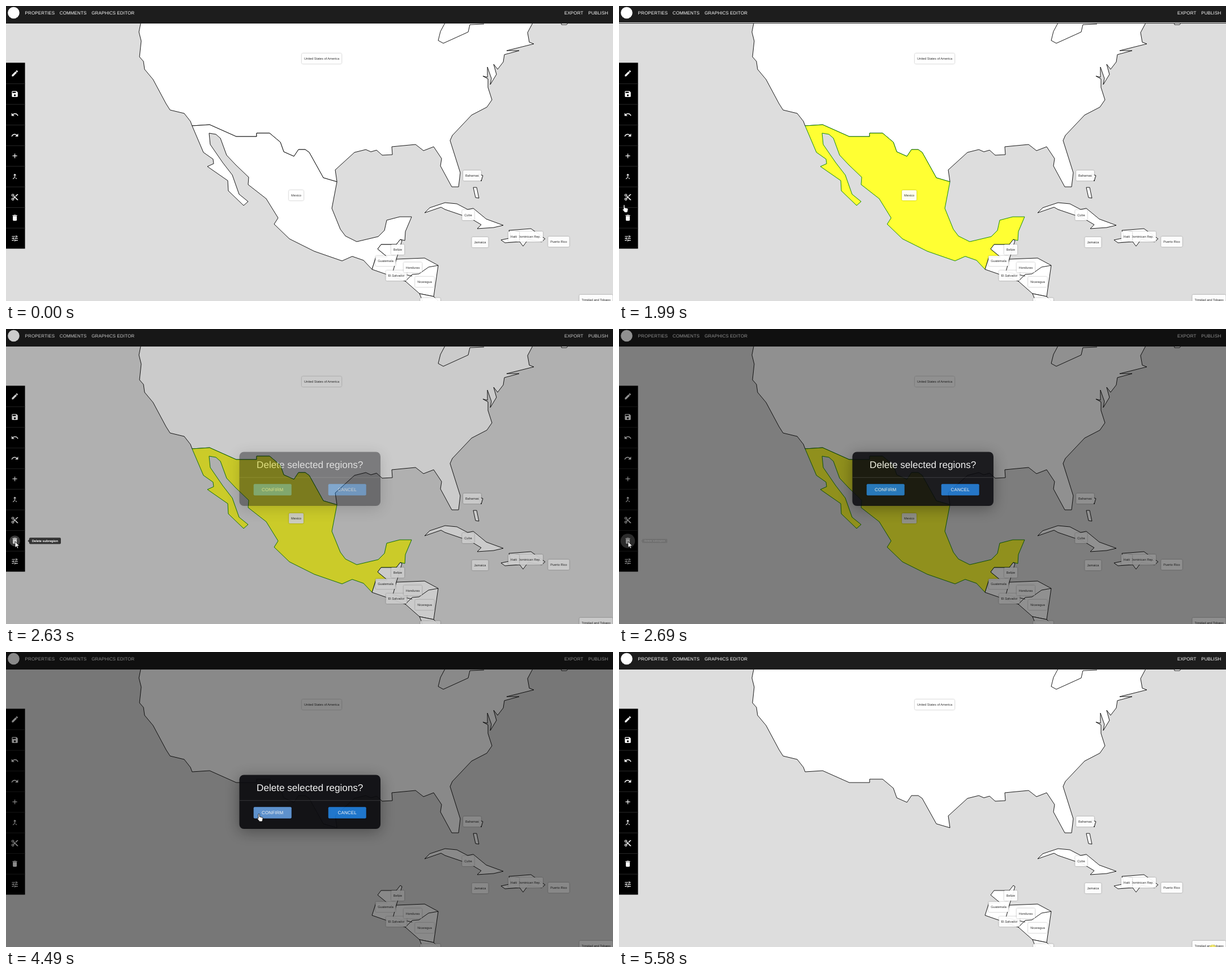
Write an HTML page that moves like this. It is 1073x522 px and loops after 5750 ms.

```html
<!DOCTYPE html>
<html lang="en">
<head>
<meta charset="utf-8">
<title>Map editor</title>
<style>
  html, body { margin: 0; width: 100%; height: 100%; overflow: hidden; background: #ddd; }
  svg { display: block; width: 1073px; height: 522px; }
  text { font-family: "Liberation Sans", Arial, sans-serif; text-rendering: geometricPrecision; }
  .land { fill: #fff; stroke: #000; stroke-width: .9; stroke-linejoin: round; }
  .line { fill: none; }
  .picked { fill: #ff3; stroke: #008000; }
  .label { opacity: .92; }
  .label rect { fill: #fff; filter: drop-shadow(0 .6px 1px rgba(0,0,0,.4)); }
  .label text { font-size: 5.65px; fill: #222; text-anchor: middle; }
  .menu { font-size: 8px; letter-spacing: .12px; fill: #fff; }
  .btn { font-size: 8px; letter-spacing: .15px; fill: #fff; text-anchor: middle; }
  #panel { filter: drop-shadow(0 5px 13px rgba(0,0,0,.38)); }
  .btnBox { filter: drop-shadow(0 1px 1px rgba(0,0,0,.4)); }
  .cursor { fill: #fff; stroke: #000; stroke-width: .8; stroke-linejoin: round; }
</style>
</head>
<body>
<svg viewBox="0 0 1073 522">
  <rect width="1073" height="522" fill="#ddd"/>
  <g id="map"></g>
  <g id="labels"></g>
  <rect width="1073" height="31" fill="#1d1d1d"/>
  <rect id="headLine" y="29" width="1073" height="1" fill="#fff"/>
  <circle cx="13.5" cy="12" r="10.3" fill="#fff"/>
  <text class="menu" x="33.6" y="14.8">PROPERTIES<tspan dx="8.6">COMMENTS</tspan><tspan dx="8.8">GRAPHICS EDITOR</tspan></text>
  <text class="menu" x="1064.3" y="14.8" text-anchor="end">EXPORT<tspan dx="8.8">PUBLISH</tspan></text>
  <rect y="100.4" width="33.6" height="329" fill="#000"/>
  <circle id="toolRipple" cx="15.5" cy="375" fill="#fff"/>
  <g id="tools"></g>
  <rect id="shade" width="1073" height="522"/>
  <g id="dialog">
    <rect id="panel" x="412.5" y="217.5" width="249.5" height="95.5" rx="8" fill="#0b0b0f"/>
    <path d="M413 262.8H662" stroke="#fff" stroke-opacity=".17"/>
    <text x="537.2" y="245.6" font-size="17.1" fill="#fff" text-anchor="middle">Delete selected regions?</text>
    <clipPath id="okClip"><rect x="437.7" y="274.2" width="67" height="20.3" rx="2"/></clipPath>
    <rect class="btnBox" id="ok" x="437.7" y="274.2" width="67" height="20.3" rx="2"/>
    <g clip-path="url(#okClip)"><circle id="okRipple" cx="447" cy="288" fill="#fff" opacity=".3"/></g>
    <rect class="btnBox" x="569.7" y="274.2" width="67" height="20.3" rx="2" fill="#1976d2"/>
    <text class="btn" x="471.2" y="287.3">CONFIRM</text>
    <text class="btn" x="603.2" y="287.3">CANCEL</text>
  </g>
  <g id="tip">
    <path d="M38.5 375L41.5 372V378Z" fill="#333"/>
    <rect x="41" y="369.3" width="56" height="11.3" rx="2" fill="#333"/>
    <text x="69" y="377" font-size="5.7" font-weight="bold" fill="#fff" text-anchor="middle">Delete subregion</text>
  </g>
  <circle id="spot" cx="1049.5" cy="524" r="6.3" fill="#f4e84a" opacity=".75"/>
  <path id="arrow" class="cursor" d="M0 0V10.8L2.5 8.5 4.2 12.2 5.9 11.4 4.2 7.9H7.6Z"/>
  <path id="hand" class="cursor" d="M-1 1a1.1 1.1 0 0 1 2.2 0V5L6 6.1Q7.2 6.5 7.1 8L6.3 12Q6 13.4 4.8 13.4H1.2L-2.6 8.8Q-3.2 7.4-2 7.3L-1 8Z"/>
</svg>
<script>
const LOOP = 5750;
const $ = id => document.getElementById(id);
const add = (parent, markup) => {
  $(parent).insertAdjacentHTML('beforeend', markup);
  return $(parent).lastElementChild;
};
const clamp = v => Math.min(1, Math.max(0, v));
const mix = (a, b, p) => a + (b - a) * p;
const span = (t, start, length) => clamp((t - start) / length);
const within = (t, a, b) => t >= a && t < b;

// Key corners of coasts and borders; neighbours share the border run
const border = '329,212 360,210 407,231 443,231 443,225 466,225 485,241 491,258 509,266 517,254 529,254 536,259 561,304 585,311';
const usEast = '582,290 616,259 636,254 645,258 655,255 665,264 683,263 682,249 724,245 738,256 756,249 770,270 768,283 788,320 800,320 '
  + '803,295 785,238 789,229 823,193 850,179 859,166 852,144 852,129 843,124 851,126 851,108 858,128 856,139 867,121 862,103 869,112 '
  + '879,99 881,86 907,79 885,79 933,67 925,64 922,47 931,30';
const usWest = '931,26 239,26 235,46 239,62 236,90 243,98 245,112 260,130 283,173 290,184 315,190 326,204';
const mxEast = '576,358 591,395 600,407 620,417 658,408 669,397 673,379 696,373 717,373 706,399 705,415 697,413 690,422 663,422 657,430 674,444 654,444 647,466';
const mxWest = '632,450 612,443 594,451 545,434 501,412 474,386 481,375 460,341 428,316 429,303 406,281 390,264 379,234 371,227 359,225';
const baja = '361,245 383,277 400,299 412,333 428,346 420,353 393,327 392,309 356,284 367,279 366,271 349,259';

const land = (...runs) => add('map', `<polygon class="land" points="${runs.join(' ')}"/>`);
const line = points => add('map', `<polyline class="land line" points="${points}"/>`);

land(border, usEast, usWest);
line('776,30 768,45 764,61 773,66 817,46 820,33 845,32');
land('981,28 982,33 991,33 995,28');
const mexico = land(border, mxEast, mxWest, baja);
// Central America
land('647,466 654,444 674,444 657,430 663,422 690,422 697,413 700,415 690,448 740,446 764,459 756,514 731,509 706,487 673,475');
line('690,448 684,470 718,478');
line('706,487 718,475 730,474 747,462 764,459');
land('731,509 756,514 768,526 738,526');
// Islands
land('740,366 749,357 776,348 797,350 816,360 826,358 849,377 879,388 862,392 833,394 840,387 820,375 776,360 769,356');
land('826,321 832,321 836,340 830,339');
land('835,297 843,300 840,310');
land('875,414 894,410 889,397 928,394 953,412 947,417 923,413 914,425 908,417 882,419');

const places = [
  ['United States of America', 558, 93], ['Mexico', 513, 335], ['Bahamas', 824, 300], ['Cuba', 817, 370],
  ['Jamaica', 838, 418], ['Dominican Rep.', 925, 408], ['Haiti', 897.5, 408], ['Puerto Rico', 977, 417],
  ['El Salvador', 690, 477], ['Guatemala', 671, 451], ['Belize', 692.5, 431], ['Honduras', 719, 462.5],
  ['Nicaragua', 740, 488], ['Costa Rica', 750, 525.5], ['Trinidad and Tobago', 1043, 520]
];
const labels = places.map(([name, x, y]) => {
  const g = add('labels', `<g class="label" transform="translate(${x} ${y})">
    <rect y="-9" height="18" rx="1.8"/><text y="2">${name}</text></g>`);
  const width = g.lastElementChild.getComputedTextLength() + 8;
  g.firstElementChild.setAttribute('x', -width / 2);
  g.firstElementChild.setAttribute('width', width);
  return g;
});

// Tool icons on a 24-unit grid
const undo = 'M2 7v9h9l-3.6-3.6a8 8 0 0 1 12.7 3.6l2.4-.8A10.5 10.5 0 0 0 5.6 10.6z';
const ring = y => `M6 ${y - 4}a4 4 0 1 0 0 8a4 4 0 1 0 0-8zm0 2a2 2 0 1 1 0 4a2 2 0 1 1 0-4z`;
const icons = [
  'M3 17v4h4L18 10 14 6zM15 5l2-2h2l2 2v2l-2 2z',
  'M17 3H5q-2 0-2 2v14q0 2 2 2h14q2 0 2-2V7zM12 13a3 3 0 1 1 0 6a3 3 0 1 1 0-6zM15 9H5V5h10z',
  undo,
  undo,
  'M19 13h-6v6h-2v-6H5v-2h6V5h2v6h6z',
  'M17 20l1.4-1-3.4-3.4-1.4 1.4zM7.5 8H11v5.6L5.6 19 7 20.4l6-6V8h3.5L12 3.5z',
  ring(6) + ring(18) + 'M9.6 7.6L22 20v1h-3l-7-7-2.4 2.4-2-2L10 12 7.6 9.6zM19 3l-6 6 2 2 7-7V3z',
  'M6 19q0 2 2 2h8q2 0 2-2V7H6zM19 4h-3.5l-1-1h-5l-1 1H5v2h14z',
  'M3 17v2h6v-2zM3 5v2h10V5zM13 21v-2h8v-2h-8v-2h-2v6zM7 9v2H3v2h4v2h2V9zM21 13v-2H11v2zM15 9h2V7h4V5h-4V3h-2v6z'
];
icons.forEach((d, i) => {
  const y = 119.2 + i * 36.5, flip = i === 3 ? -1 : 1;
  add('tools', `<path d="${d}" fill="#fff" fill-rule="evenodd" transform="translate(15.6 ${y}) scale(${.58 * flip} .58) translate(-12 -12)"/>`);
  if (i) add('tools', `<rect y="${y - 18.6}" width="33.6" height="1" fill="#282828"/>`);
});

// Eases along cubic-bezier(.4, 0, .2, 1)
function ease(p) {
  let lo = 0, hi = 1, s = .5;
  for (let i = 0; i < 20; i++) {
    s = (lo + hi) / 2;
    const x = 1.2 * (1 - s) ** 2 * s + .6 * (1 - s) * s * s + s ** 3;
    if (x < p) lo = s; else hi = s;
  }
  return 3 * (1 - s) * s * s + s ** 3;
}
const eased = (t, start, length) => ease(span(t, start, length));

// Pointer moves: start, end, x, y
const moves = [
  [60, 510, 3, 125], [640, 850, 516, 330], [1550, 2100, 5, 352],
  [2130, 2300, 16, 376], [2720, 3270, 447, 286.5], [4640, 4880, 1049, 523]
];
function pointer(t) {
  let x = 905, y = 488;
  for (const [from, to, nx, ny] of moves) {
    const p = 1 - (1 - span(t, from, to - from)) ** 3;
    x = mix(x, nx, p);
    y = mix(y, ny, p);
  }
  return [x, y];
}

const show = (el, on) => { el.style.display = on ? '' : 'none'; };

function draw(t) {
  const gone = t >= 4440;
  mexico.classList.toggle('picked', t >= 1390);
  show(mexico, !gone);
  show(labels[1], !gone);
  show($('headLine'), within(t, 1250, 2556));
  show($('spot'), t >= 5580);

  const open = eased(t, 2563, 215) - eased(t, 4464, 171);
  $('shade').setAttribute('opacity', open * .5);
  $('dialog').setAttribute('opacity', open);

  const hover = span(t, 3290, 110);
  $('ok').setAttribute('fill', `rgb(${mix(25, 21, hover)},${mix(118, 101, hover)},${mix(210, 192, hover)})`);
  $('okRipple').setAttribute('r', 66 * eased(t, 4060, 550));
  $('toolRipple').setAttribute('r', 13.5 * eased(t, 2530, 225));
  $('toolRipple').setAttribute('opacity', .3 * (1 - eased(t, 2710, 550)));

  const tip = eased(t, 2250, 200) - eased(t, 2630, 110);
  const size = mix(.75, 1, tip);
  $('tip').setAttribute('opacity', tip);
  $('tip').setAttribute('transform', `translate(41 375) scale(${size} ${size * size}) translate(-41 -375)`);

  const [x, y] = pointer(t);
  const hand = within(t, 720, 2556) || within(t, 3000, 4650);
  const seen = within(t, 60, 4880);
  show($('hand'), seen && hand);
  show($('arrow'), seen && !hand);
  for (const id of ['hand', 'arrow']) $(id).setAttribute('transform', `translate(${x} ${y})`);
}

const start = performance.now();
function tick() {
  draw((performance.now() - start) % LOOP);
  requestAnimationFrame(tick);
}
tick();
</script>
</body>
</html>
```
